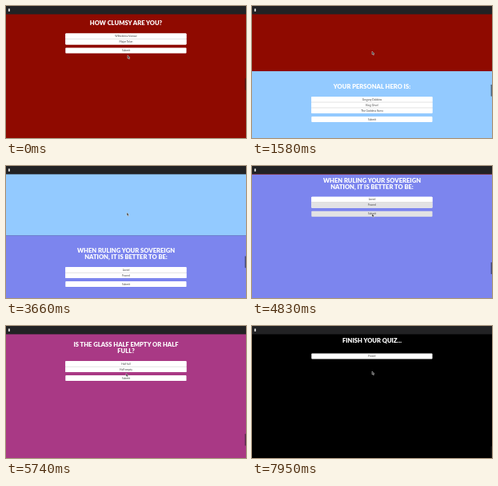
Animation, 300 px wide and 166 px high, one loop 8000 ms. Source, as an HTML page:

```html
<!DOCTYPE html>
<html lang="en">
<head>
<meta charset="utf-8">
<title>Quiz</title>
<style>
html, body { margin: 0; width: 100%; height: 100%; overflow: hidden; background: #000; }
svg { display: block; width: 100vw; height: 100vh; }
text { text-anchor: middle; }
.title { font: 900 7.6px Lato, Inter, sans-serif; fill: #fff; }
.label { font: 3.3px Lato, "Open Sans", sans-serif; fill: #444; }
</style>
</head>
<body>
<svg id="stage" viewBox="0 0 300 166"></svg>
<script>
const LOOP = 8000, HEIGHT = 168, ROW = 7;
const stage = document.getElementById("stage");

const sections = [
  { bg: "#8f0a00", title: ["HOW CLUMSY ARE YOU?"], options: ["Wilhelmina Varrow", "Major Tolan"],
    pick: 1, at: 600, active: "#e3dcdb" },
  { bg: "#93caff", title: ["YOUR PERSONAL HERO IS:"], options: ["Gregory Dabbins", "King Orvel", "The Goddess Ilvera"],
    pick: 2, at: 2490, active: "#e2e5e8" },
  { bg: "#7c85ee", title: ["WHEN RULING YOUR SOVEREIGN", "NATION, IT IS BETTER TO BE:"], options: ["Loved", "Feared"],
    pick: 1, at: 4440, active: "#e2e2e4" },
  { bg: "#a93985", title: ["IS THE GLASS HALF EMPTY OR HALF", "FULL?"], options: ["Half full", "Half empty"],
    pick: 0, at: 6390, active: "#e7c8df" },
  { bg: "#000", title: ["FINISH YOUR QUIZ..."], options: [], button: "Finish!", active: "#e4e4e4" }
];

// [time, value...]
const scrollKeys = [
  [0, -2.5], [300, 2], [1180, 2], [1980, 170], [3275, 170], [4075, 337],
  [5047, 337], [5847, 507], [7050, 507], [7850, 673]
];
const cursorKeys = [
  [0, 152, 62], [200, 151, 50], [400, 150, 41], [750, 150, 41], [1000, 150, 57],
  [2000, 150, 57], [2330, 150, 45], [2600, 150, 45], [2870, 151, 58.5], [4060, 151, 58.5],
  [4300, 151, 47], [4500, 151, 47], [4700, 150, 60], [5850, 150, 59.5], [6200, 151, 40],
  [6500, 151, 40], [6780, 152, 60.5], [7100, 152, 60.5], [7600, 150, 57]
];

function add(parent, tag, attrs, text) {
  const el = document.createElementNS("http://www.w3.org/2000/svg", tag);
  for (const key in attrs) el.setAttribute(key, attrs[key]);
  if (text) el.textContent = text;
  return parent.appendChild(el);
}

function box(parent, y, count) {
  add(parent, "rect", { x: 74.3, y, width: 151.2, height: ROW * count, rx: 0.9, fill: "#fff" });
}

function row(parent, y, text) {
  const fill = add(parent, "rect", { x: 74.3, y, width: 151.2, height: ROW, rx: 0.9, fill: "#fff" });
  add(parent, "text", { class: "label", x: 150, y: y + ROW / 2 + 1.1 }, text);
  return { fill, y };
}

function build(s, i) {
  const g = add(stage, "g", {});
  add(g, "rect", { width: 300, height: HEIGHT + 0.2, fill: s.bg });
  s.title.forEach((line, n) => add(g, "text", { class: "title", x: 150, y: 21.7 + n * 8.1 }, line));
  const top = 32 + (s.title.length - 1) * 7.7;
  const count = s.options.length;
  if (count) box(g, top, count);
  const rows = s.options.map((text, n) => row(g, top + n * ROW, text));
  for (let n = 1; n < count; n++)
    add(g, "rect", { x: 74.3, y: top + n * ROW - 0.2, width: 151.2, height: 0.4, fill: "#bbb" });
  rows.push(row(g, count ? top + count * ROW + 4 : 35.5, s.button || "Submit"));
  return { ...s, g, rows, offset: i * HEIGHT };
}

const pages = sections.map(build);
const thumb = add(stage, "rect", { x: 298.6, width: 1.4, height: 15, rx: 0.6, fill: "#222", opacity: 0.6 });
const glow = add(stage, "rect", { y: 10, width: 300, height: 0.9, fill: "#c8506e" });
add(stage, "rect", { width: 300, height: 10.4, fill: "#222224" });
add(stage, "rect", { x: 2.9, y: 3.4, width: 2, height: 3.4, fill: "#ddd" });
const cursor = add(stage, "path", {
  d: "M0 0V4L1 3.2L1.7 4.8L2.5 4.4L1.8 2.9H3Z",
  fill: "#333", stroke: "#e8e8e8", "stroke-width": 0.45
});

function track(keys, t) {
  const next = keys.findIndex(k => k[0] > t);
  if (next < 0) return keys[keys.length - 1].slice(1);
  const a = keys[next - 1], b = keys[next];
  const e = (1 - Math.cos(Math.PI * (t - a[0]) / (b[0] - a[0]))) / 2;
  return a.slice(1).map((v, i) => v + (b[i + 1] - v) * e);
}

function step(t) {
  return t < 800 ? Math.floor(t / 200) * 200 : 800 + Math.floor((t - 800) / 130) * 130;
}

function draw(time) {
  const t = step(time % LOOP);
  const [scroll] = track(scrollKeys, t);
  const [x, y] = track(cursorKeys, t);
  for (const p of pages) {
    const top = p.offset - scroll;
    p.g.setAttribute("transform", `translate(0 ${top})`);
    p.rows.forEach((r, n) => {
      const picked = n === p.pick && t >= p.at;
      const hover = y >= top + r.y && y < top + r.y + ROW;
      r.fill.setAttribute("fill", picked || hover ? p.active : "#fff");
    });
  }
  thumb.setAttribute("y", 91 + scroll / HEIGHT * 15);
  glow.setAttribute("visibility", t >= 4440 && t < 5047 ? "visible" : "hidden");
  cursor.setAttribute("transform", `translate(${x} ${y})`);
}

const start = performance.now();
function tick() {
  draw(performance.now() - start);
  requestAnimationFrame(tick);
}
tick();
</script>
</body>
</html>
```
